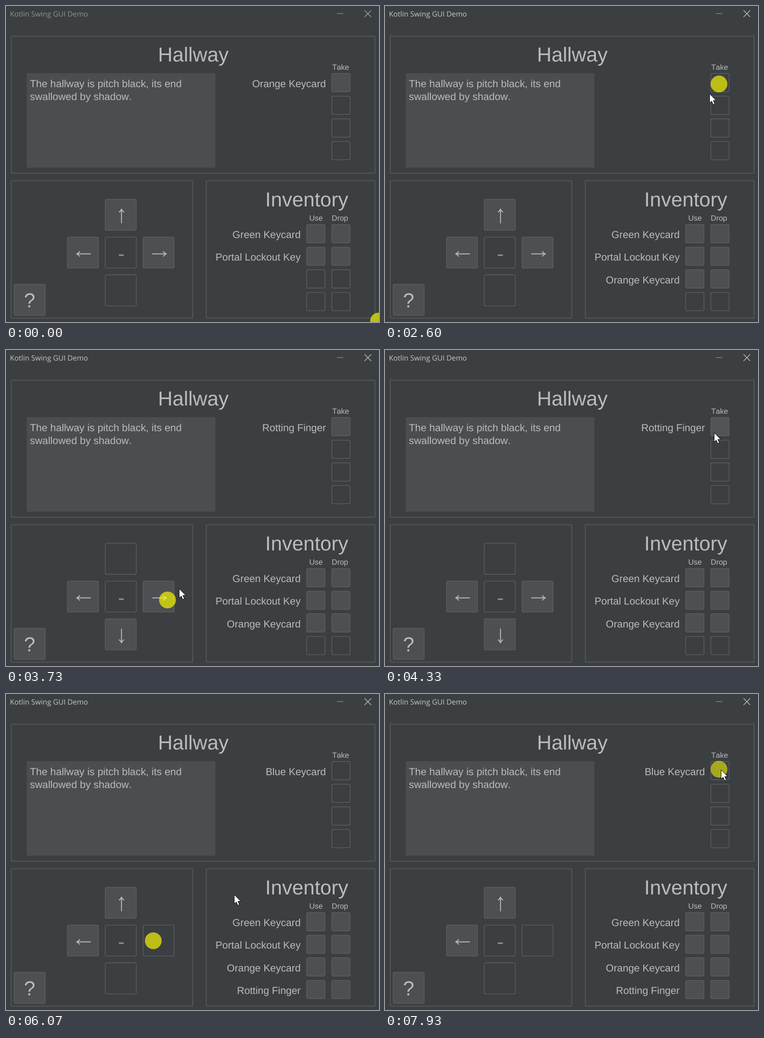
An HTML page that plays this animation: 813 by 689 pixels, repeating every 8000 ms.

```html
<!DOCTYPE html>
<html lang="en">
<head>
<meta charset="utf-8">
<title>Kotlin Swing GUI Demo</title>
<style>
  html, body { margin: 0; width: 100%; height: 100%; overflow: hidden; background: #3c3f41; }
  svg { display: block; width: 100%; height: 100%; }
  text {
    font: 22.1px "Liberation Sans", Arial, sans-serif;
    fill: #bbb; font-kerning: none; text-rendering: geometricPrecision;
  }
  text.big { font-size: 44px; font-kerning: normal; }
  text.small { font-size: 16.5px; }
  text.area { font-size: 22.3px; }
  text.caption { font: 15.8px "Open Sans", "Noto Sans", sans-serif; }
  .end { text-anchor: end; }
  .mid { text-anchor: middle; }
  .panel { fill: none; stroke: #4e5052; stroke-width: 2.75; }
  .button { stroke: #5e6060; stroke-width: 1.35; }
  .arrow { fill: none; stroke: #bbb; stroke-width: 2; }
  .icon { fill: none; stroke: #8f9192; stroke-width: 1.25; }
</style>
</head>
<body>
<svg id="stage" viewBox="0 0 813 689" preserveAspectRatio="none"></svg>
<script>
const LOOP = 8000, FRAME = 1000 / 15;
const PRESS = 140, HOLD = 560, FADE = 240;

// Mouse presses; a press takes effect when the button is released
const clicks = [-330, 2130, 3400, 4730, 5730, 7130, 7330];
const [, takeOrange, goRight, takeFinger, goOn] = clicks.map(time => time + PRESS);
const focusTime = clicks[1];

// Pointer moves: start, end, then the place reached
const moves = [
  [-400, -400, 812, 687],
  [0, 0, 563, 705],
  [1050, 1730, 699, 188],
  [1730, 1870, 728, 170],
  [2470, 3370, 352, 545],
  [3600, 4430, 732, 165],
  [5070, 5750, 320, 539],
  [5870, 6330, 759, 286],
  [6330, 6930, 728, 164],
  [7670, 7930, 732, 165]
];

// State of the game
const always = () => true, never = () => false;
const inSecondHall = t => t >= goRight && t < goOn;
const inFirstHalls = t => t < goOn;
const inventory = [
  ['Green Keycard', always],
  ['Portal Lockout Key', always],
  ['Orange Keycard', t => t >= takeOrange],
  ['Rotting Finger', t => t >= takeFinger]
];
function roomItem(t) {
  if (t >= goOn) return 'Blue Keycard';
  if (t >= goRight) return t < takeFinger ? 'Rotting Finger' : '';
  return t < takeOrange ? 'Orange Keycard' : '';
}
const canTake = t => t < takeFinger && roomItem(t) !== '';

// Drawing helpers
const stage = document.getElementById('stage');
const buttons = [], optional = [];

function add(tag, attrs, content = '') {
  const node = document.createElementNS('http://www.w3.org/2000/svg', tag);
  for (const key in attrs) node.setAttribute(key, attrs[key]);
  node.textContent = content;
  return stage.appendChild(node);
}
const label = (x, y, content, cls = '') => add('text', { x, y, class: cls }, content);
const panel = (x, y, width, height) => add('rect', { x, y, width, height, rx: 1, class: 'panel' });
const icon = d => add('path', { d, class: 'icon' });

function button(x, y, size, enabled) {
  const node = add('rect', { x, y, width: size, height: size, rx: 3, class: 'button' });
  buttons.push({ node, x, y, size, enabled });
}
const smallButton = (x, y, enabled) => button(x, y, 39.8, enabled);
const bigButton = (x, y, enabled) => button(x, y, 67.6, enabled);

function direction(angle, enabled) {
  const turn = angle * Math.PI / 180, reach = 82.4;
  const x = 250.2 + reach * Math.sin(turn), y = 537.6 - reach * Math.cos(turn);
  bigButton(x - 33.8, y - 33.8, enabled);
  const node = add('path', {
    d: 'M0-15V15.5M-5.5-8.5Q-2-11 0-15Q2-11 5.5-8.5',
    transform: `translate(${x + 1.5} ${y + 3}) rotate(${angle})`, class: 'arrow'
  });
  optional.push([node, enabled]);
}

// Window frame
const caption = label(8.5, 23, 'Kotlin Swing GUI Demo', 'caption');
icon('M721.5 16.5H735.5');
const closeIcon = icon('M781.5 9.5L796 24M796 9.5L781.5 24');

// Room
panel(11.4, 65.9, 793, 298.6);
label(408.3, 121.3, 'Hallway', 'big mid');
add('rect', { x: 45, y: 146.5, width: 411.5, height: 206, fill: '#4a4e51' });
label(52, 177, 'The hallway is pitch black, its end', 'area');
label(52, 205, 'swallowed by shadow.', 'area');
label(711, 139, 'Take', 'small');
const itemText = label(697.3, 177, '', 'end');

// Directions
panel(11.4, 380.9, 395.6, 299.6);
direction(0, t => !inSecondHall(t));
direction(90, inFirstHalls);
direction(180, inSecondHall);
direction(270, always);
bigButton(216.4, 503.8, never);
label(251.3, 554.5, '-', 'big mid').style.fill = '#8c8c8c';
bigButton(17.8, 607, always);
label(51.5, 657, '?', 'big mid');

// Inventory, with the rows of the room on the same grid
panel(436.6, 380.9, 367.8, 299.6);
label(565, 437.3, 'Inventory', 'big');
label(661, 468, 'Use', 'small');
label(710, 468, 'Drop', 'small');
inventory.forEach(([name, owned], i) => {
  const down = 49.4 * i;
  smallButton(710.2, 147.2 + down, i ? never : canTake);
  smallButton(655.4, 476.4 + down, owned);
  smallButton(710.2, 476.4 + down, owned);
  optional.push([label(642.2, 506 + down, name, 'end'), owned]);
});

// Motion
const ease = u => u * u * (3 - 2 * u);

function pointerAt(t) {
  let [, , x, y] = moves[0];
  for (const [start, end, toX, toY] of moves) {
    if (t < start) break;
    const part = t >= end ? 1 : ease((t - start) / (end - start));
    x += (toX - x) * part;
    y += (toY - y) * part;
  }
  return [x, y];
}

const marks = clicks.map(time => {
  const [cx, cy] = pointerAt(time);
  return add('circle', { cx, cy, r: 18.3, fill: '#ff0' });
});
const markOpacity = age => age < 0 ? 0 : 0.66 * Math.max(0, Math.min(1, 1 - (age - HOLD) / FADE));

const pointer = add('path', {
  d: 'M.5.5V20.6L5 16.4L8.2 23.8L11.7 22.3L8.5 15H14.8Z',
  fill: '#fff', stroke: '#000', 'stroke-width': 1
});

function buttonFill({ x, y, size, enabled }, t, [px, py], pressed) {
  if (!enabled(t)) return '#3c3f41';
  const inside = offset => offset > 3 && offset < size - 3;
  if (!inside(px - x) || !inside(py - y)) return '#4c5052';
  return pressed ? '#585c5f' : '#515557';
}

function draw(t) {
  const at = pointerAt(t);
  const pressed = clicks.some(time => t >= time && t < time + PRESS);
  pointer.setAttribute('transform', `translate(${at.map(Math.round)})`);
  caption.style.fill = t < focusTime ? '#8f9192' : '#c4c4c4';
  closeIcon.style.stroke = t < focusTime ? '#a9aaab' : '#c8c8c8';
  itemText.textContent = roomItem(t);
  for (const [node, test] of optional) node.style.visibility = test(t) ? 'visible' : 'hidden';
  for (const b of buttons) b.node.setAttribute('fill', buttonFill(b, t, at, pressed));
  marks.forEach((mark, i) => mark.setAttribute('opacity', markOpacity(t - clicks[i])));
}

const origin = performance.now();
function tick(now) {
  const t = Math.max(0, now - origin) % LOOP;
  const step = Math.floor((t + 3.4) / FRAME);
  draw(Math.round(step * FRAME / 10) * 10 % LOOP);
  requestAnimationFrame(tick);
}
draw(0);
requestAnimationFrame(tick);
</script>
</body>
</html>
```
